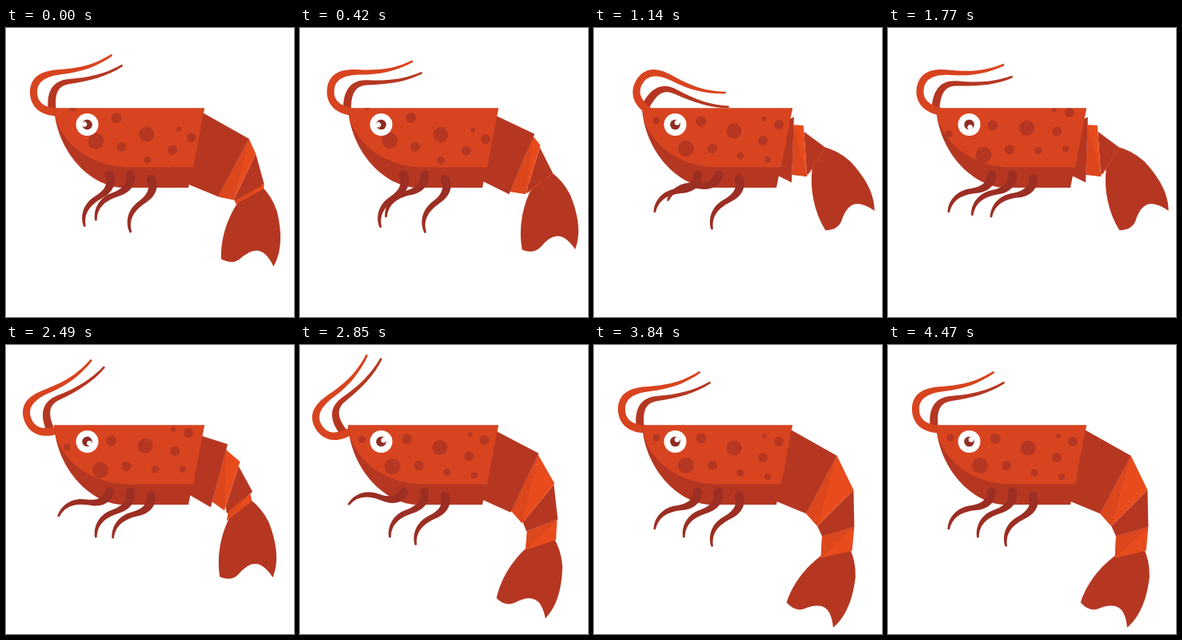
Animation of 360 by 362 pixels, one loop 4.5 s. Source, as an HTML page with a canvas:

```html
<!DOCTYPE html>
<html>
<head>
<meta charset="utf-8">
<title>Shrimp</title>
<style>
html, body { margin: 0; width: 100%; height: 100%; overflow: hidden; background: #fff; }
canvas { display: block; }
</style>
</head>
<body>
<canvas id="stage" width="360" height="362"></canvas>
<script>
const ctx = document.getElementById('stage').getContext('2d');
const LOOP = 4500, BEAT = 900, LEAD = 660, HOLD = 90;
const ORANGE = '#d8441f', DARK = '#b53722', LEG = '#9c2e23', BRIGHT = '#e84c1d', FACET = '#dc471d';

const body = new Path2D('M60 100.500H248L228 200H145C105 198 64 156 60 100.500Z');
const back = new Path2D('M60 100.500H248L234 174.500H150C106 172 75 148 63 117Z');
const frontFeeler = new Path2D('M66 110C42 111 29 97 30 78C32 58 48 53 68 52C95 50 112 45 132 32.500L133 35C112 49 95 55 70 58C52 60 39 66 39 80C39 95 50 100 66 101Z');
const rearFeeler = new Path2D('M53 104C50 80 58 66 78 64C105 62 125 57 145 45.500L146 48C126 61 105 66 80 70C65 72 60 82 63 104Z');
const leg = new Path2D('M5 -1C5 10 -3 21 -21 22C-40 24 -50 32 -53 46L-55.500 46C-55 31 -44 18 -26 16C-13 14 -6 8 -6 -1A5.500 5.500 0 0 1 5 -1Z');
const fan = new Path2D('M-19 3L-15 9C-30 28 -41 55 -41 82Q-28 90 -18 83Q2 66 14 78Q20 84 24 94C36 75 36 50 31 25Q25 5 12 -8L8 -13Z');

// x, y, radius
const spots = [
  [78, 116, 4.5], [134, 117, 6.5], [175, 129, 9.5], [213, 114, 3], [231, 121, 6],
  [211, 141, 6], [148, 151, 6], [115, 151, 10], [183, 160, 4.5], [217, 165, 4]
];

// Tail rings: half width, tilt, extra tilt when open, shift when closed, extra shift when open
const rings = [
  { half: 32, tilt: -4, turn: 23, shut: [15.5, 1.5], open: [4, 21], color: BRIGHT },
  { half: 21, tilt: 32, turn: 16, shut: [13.5, 13], open: [-3, 12], color: DARK },
  { half: 20, tilt: 32, turn: 19, shut: [1, 0], open: [-3, 28], color: BRIGHT }
];
const BEND = 26;

const mix = (a, b, u) => a + (b - a) * u;
const radians = degrees => degrees * Math.PI / 180;

function fill(color, path) {
  ctx.fillStyle = color;
  ctx.fill(path);
}

function polygon(color, points) {
  ctx.beginPath();
  points.forEach(p => ctx.lineTo(...p));
  ctx.fillStyle = color;
  ctx.fill();
}

function circle(color, x, y, r) {
  ctx.beginPath();
  ctx.arc(x, y, r, 0, 2 * Math.PI);
  ctx.fillStyle = color;
  ctx.fill();
}

function turned(x, y, degrees, draw) {
  ctx.save();
  ctx.translate(x, y);
  ctx.rotate(radians(degrees));
  draw();
  ctx.restore();
}

// A cross-section of the tail; u runs from its top to its bottom
const edge = (x, y, half, tilt) => u => {
  const d = half * (1 - 2 * u);
  return [x + d * Math.sin(radians(tilt)), y - d * Math.cos(radians(tilt))];
};

// root unfolds the first ring, tip the remaining ones
function drawTail(root, tip) {
  const bend = BEND * root, c = Math.cos(radians(bend)), s = Math.sin(radians(bend));
  let x = 248.5 + 36 * root, y = 152.5 + 22.5 * root;
  const edges = [edge(235, 150, 46, 10.7), edge(x, y, 41, 2 + bend)];
  for (const { half, tilt, turn, shut, open } of rings) {
    x += shut[0] * c - shut[1] * s + open[0] * tip;
    y += shut[0] * s + shut[1] * c + open[1] * tip;
    edges.push(edge(x, y, half, tilt + bend + turn * tip));
  }

  turned(x + 2, y - 5, -32 + bend + 24 * tip, () => fill(DARK, fan));
  const inset = .12 * (1 - root * root);
  for (let i = 3; i >= 0; i--) {
    const near = edges[i], far = edges[i + 1];
    const color = i ? rings[i - 1].color : DARK;
    polygon(color, [near(inset), far(0), far(1), near(1 - inset)]);
    if (color === BRIGHT) polygon(FACET, [near(inset), far(1), near(1 - inset)]);
  }
}

function drawEye(turn) {
  circle('#fff', 101.5, 121, 14);
  turned(101.5, 121, turn, () => {
    circle('#8f2d24', 0, 0, 6.3);
    circle('#fff', 2.4, -2.6, 3.2);
  });
}

function draw(t) {
  const beat = (t + LEAD) / BEAT;
  const pulse = n => Math.max(0, 1 - Math.abs(beat - n));
  const roll = pulse(1) - pulse(3);
  const root = 1 - pulse(2) - pulse(3);
  const tip = Math.max(0, root - pulse(1)) ** 1.4;

  ctx.fillStyle = '#fff';
  ctx.fillRect(0, 0, 360, 362);
  drawTail(root, tip);

  turned(69, 112, 33 * pulse(2) - 34 * pulse(4), () => {
    ctx.translate(-69, -112);
    fill(DARK, rearFeeler);
    fill(ORANGE, frontFeeler);
  });

  fill(DARK, body);
  fill(ORANGE, back);
  ctx.save();
  ctx.clip(body);
  turned(156, 134, 17 * roll, () => {
    for (const [x, y, r] of spots) circle(DARK, x - 156, y - 134, r);
  });
  ctx.restore();
  drawEye(-170 * roll);

  const drawLeg = () => fill(LEG, leg);
  turned(130, 185, 31 * pulse(4) - 32 * pulse(1), drawLeg);
  turned(156, 185, 26 * pulse(2) - 12, drawLeg);
  turned(182, 190, 28 * pulse(3) - 10 * pulse(1) - 21, drawLeg);
}

// Each drawing is held for a moment
function frame() {
  const t = performance.now() % LOOP;
  draw(t < 30 ? 0 : 60 + HOLD * Math.max(0, Math.floor((t - 60) / HOLD)));
  requestAnimationFrame(frame);
}
frame();
</script>
</body>
</html>
```
